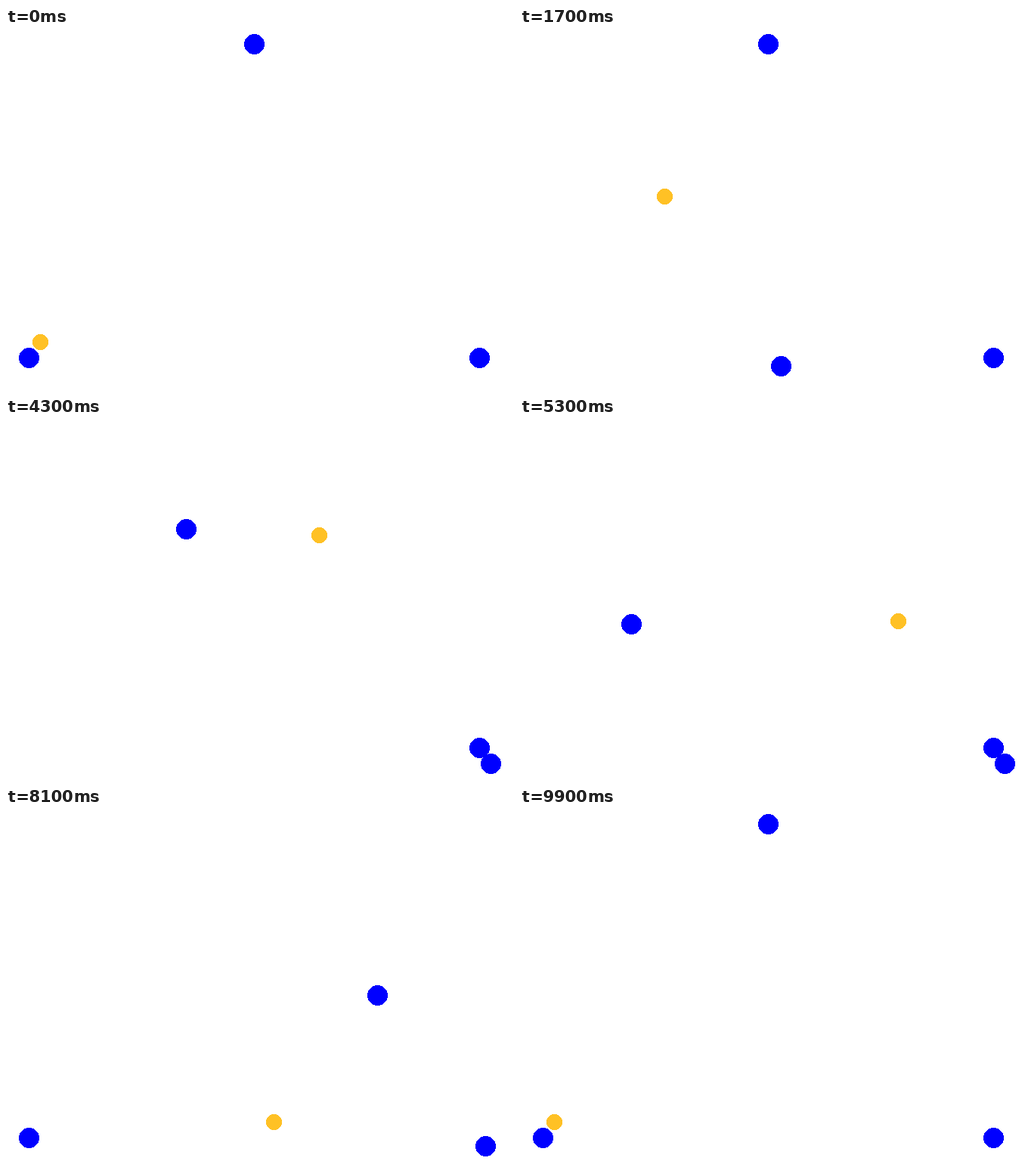
An HTML page with a canvas that plays this animation: 672 px wide and 480 px high, repeating every 10000 ms.

```html
<!DOCTYPE html>
<html lang="en">
<head>
<meta charset="utf-8">
<title>Moving dots</title>
<style>
html, body { margin: 0; width: 100%; height: 100%; overflow: hidden; background: #fff; }
canvas { display: block; }
</style>
</head>
<body>
<canvas id="stage" width="672" height="480"></canvas>
<script>
const canvas = document.getElementById('stage');
const ctx = canvas.getContext('2d');
const STEP_MS = 100, STEPS = 100, LEG = 33;
const BLUE = '#0000ff', GOLD = '#ffc125';
const MID = 328, SPREAD = 298, TOP = 21, BASE = 437;
const GAP = { x: 15, y: 21 };

const clamp = v => Math.min(1, Math.max(0, v));
const lerp = (a, b, k) => ({ x: a.x + (b.x - a.x) * k, y: a.y + (b.y - a.y) * k });

// Triangle corners in order: left, top, right.
function corner(i) {
  const side = (i + 3) % 3 - 1;
  return { x: MID + SPREAD * side, y: side ? BASE : TOP, side };
}

// Resting place of the gold dot, just inside a corner.
function inside(i) {
  const { x, y, side } = corner(i);
  return { x: x - GAP.x * side, y: y + (side ? -GAP.y : GAP.y) };
}

// Crisp disc built from whole-pixel rows, without soft edges.
function disc(p, r, color) {
  const x = Math.round(p.x), y = Math.round(p.y);
  ctx.fillStyle = color;
  for (let dy = -r; dy <= r; dy++) {
    const half = Math.floor(Math.sqrt((r + 0.45) ** 2 - dy * dy));
    ctx.fillRect(x - half, y + dy, 2 * half + 1, 1);
  }
}

function draw(ms) {
  const step = Math.floor(ms / STEP_MS) % STEPS;
  const leg = Math.min(2, Math.floor(step / LEG));
  const progress = n => clamp((step - n * LEG) / LEG);

  ctx.fillStyle = '#fff';
  ctx.fillRect(0, 0, canvas.width, canvas.height);
  disc(lerp(inside(leg), inside(leg + 1), progress(leg)), 10, GOLD);

  // Each blue dot takes one leg to reach the previous corner; the first
  // waits beside its still occupied corner and settles in the last leg.
  for (let i = 0; i < 3; i++) {
    const goal = corner(i - 1);
    const wait = i === 0 ? 1 - progress(2) : 0;
    const stop = { x: goal.x + GAP.x * wait, y: goal.y + GAP.y * wait };
    disc(lerp(corner(i), stop, progress(i)), 13, BLUE);
  }
}

const start = performance.now();
function tick(now) {
  draw(Math.max(0, now - start));
  requestAnimationFrame(tick);
}
draw(0);
requestAnimationFrame(tick);
</script>
</body>
</html>
```
